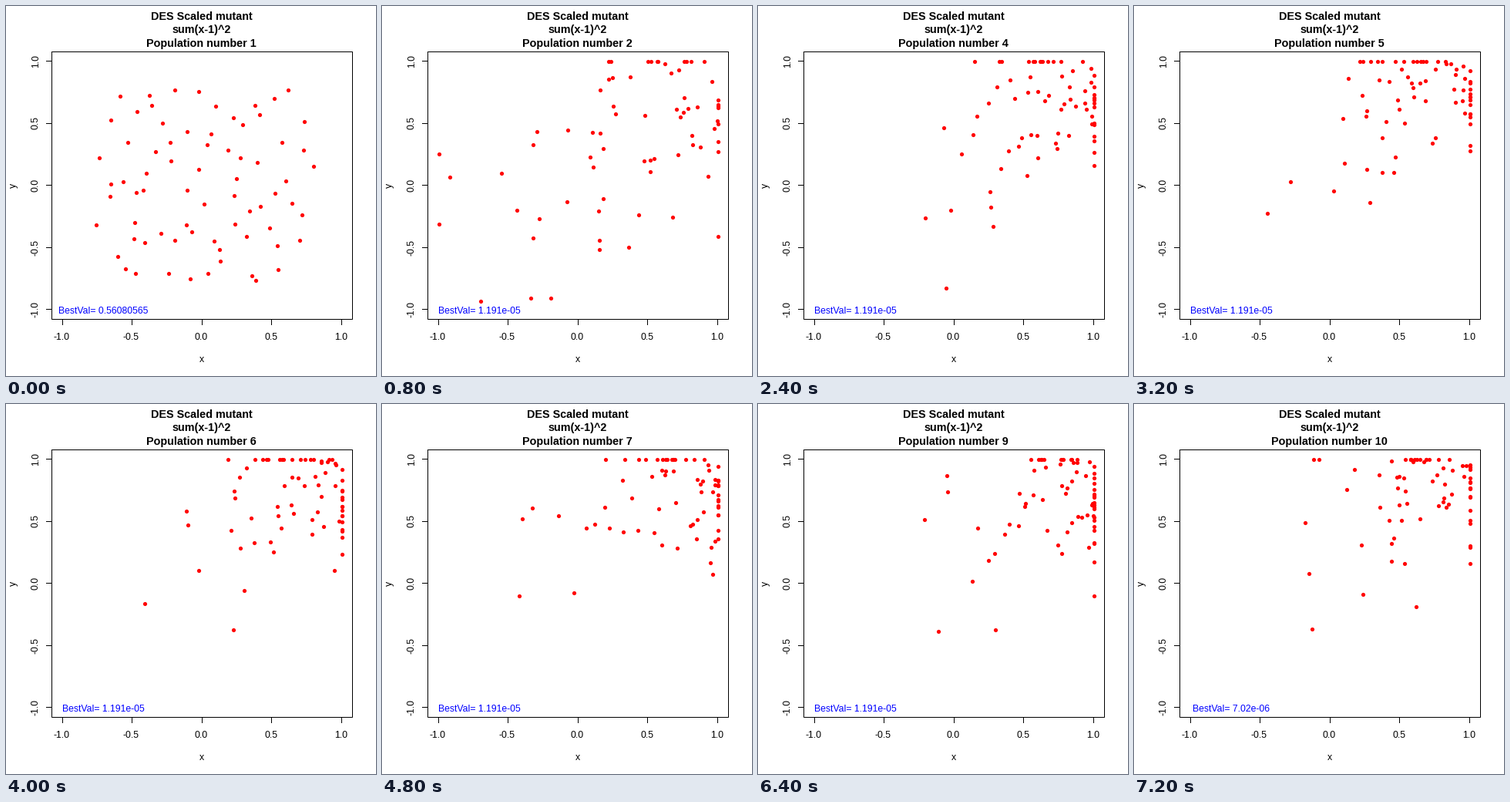
These frames come from a looping animation (480 px wide and 480 px high, 8 s). A matplotlib script:

```python
import numpy as np
import matplotlib.pyplot as plt
from matplotlib.animation import FuncAnimation

SIZE = 480
DPI = 72  # one point equals one pixel
GENERATIONS = 10
COLS, ROWS = 9, 8
POPULATION = COLS * ROWS
LEFT, RIGHT, TOP, BOTTOM = 59, 449, 59, 406
CENTER_X, CENTER_Y = 253.5, 232.5


def to_pixel(x, y):
    """Map data values to the centre of the pixel they fall in."""
    return (np.floor(254 + 181 * np.asarray(x)) + 0.5,
            np.floor(CENTER_Y - 161 * np.asarray(y)) + 0.5)


def first_swarm(rng):
    """Even scatter over a start square with slightly drawn-in corners."""
    col, row = np.divmod(np.arange(POPULATION), ROWS)
    u = 2 * (col + rng.random(POPULATION)) / COLS - 1
    v = 2 * (row + rng.random(POPULATION)) / ROWS - 1
    return 0.81 * u * (1 - 0.2 * v ** 2), 0.8 * v


def later_swarm(rng, gen):
    """Cloud along the diagonal below the optimum, cut off at the bounds."""
    settle = np.exp(-(gen - 2) / 1.2)
    rank = (np.arange(POPULATION) + 0.5) / POPULATION
    dist = -(0.3 + 0.42 * settle) * np.log(rank)
    dist = 1.9 * np.tanh(dist / 1.9)
    side = rng.normal(0, 0.24 + 0.14 * settle, POPULATION)
    return np.clip(1 - dist + side, -1, 1), np.clip(1 - dist - side, -1, 1)


def swarm(gen):
    rng = np.random.default_rng(40 + gen)
    return to_pixel(*(first_swarm(rng) if gen == 1 else later_swarm(rng, gen)))


def best_value(gen):
    return {1: "0.56080565", GENERATIONS: "7.02e-06"}.get(gen, "1.191e-05")


plt.rcParams["font.family"] = "Liberation Sans"
fig = plt.figure(figsize=(SIZE / DPI, SIZE / DPI), dpi=DPI, facecolor="white")
ax = fig.add_axes([0, 0, 1, 1])
ax.set_xlim(0, SIZE)
ax.set_ylim(SIZE, 0)
ax.axis("off")


def label(x, y, text, size=12.25, **style):
    return ax.text(x, y, text, fontsize=size, ha="center", va="baseline",
                   rotation_mode="anchor", zorder=3, **style)


def heading(y, text=""):
    return label(CENTER_X, y, text, 14.4, weight="bold")


def line(xs, ys):
    ax.plot(np.array(xs) + 0.5, np.array(ys) + 0.5, color="black", lw=1,
            solid_capstyle="projecting", solid_joinstyle="miter",
            snap=False, zorder=1)


line([LEFT, RIGHT, RIGHT, LEFT, LEFT], [TOP, TOP, BOTTOM, BOTTOM, TOP])
for value in np.arange(-1, 1.1, 0.5):
    px, py = (int(p) for p in to_pixel(value, value))
    line([px, px], [BOTTOM, BOTTOM + 7])
    line([LEFT - 7, LEFT], [py, py])
    label(px - 0.5, 433, f"{value:.1f}")
    label(42, py, f"{value:.1f}", rotation=90)
label(CENTER_X, 462, "x")
label(13, CENTER_Y, "y", rotation=90)

heading(18, "DES Scaled mutant")
heading(35.5, "sum(x-1)^2")
title = heading(53)
best = label(126.5, 399, "", color="#0000ff")
dots, = ax.plot([], [], "o", color="#ff0000", ms=5.2, mew=0,
                antialiased=False, snap=False, zorder=2)

swarms = [swarm(gen) for gen in range(1, GENERATIONS + 1)]


def update(frame):
    gen = frame + 1
    dots.set_data(*swarms[frame])
    title.set_text(f"Population number {gen}")
    best.set_text(f"BestVal= {best_value(gen)}")
    return dots, title, best


anim = FuncAnimation(fig, update, frames=GENERATIONS, interval=800,
                     repeat=True, repeat_delay=0)
plt.show()
```
